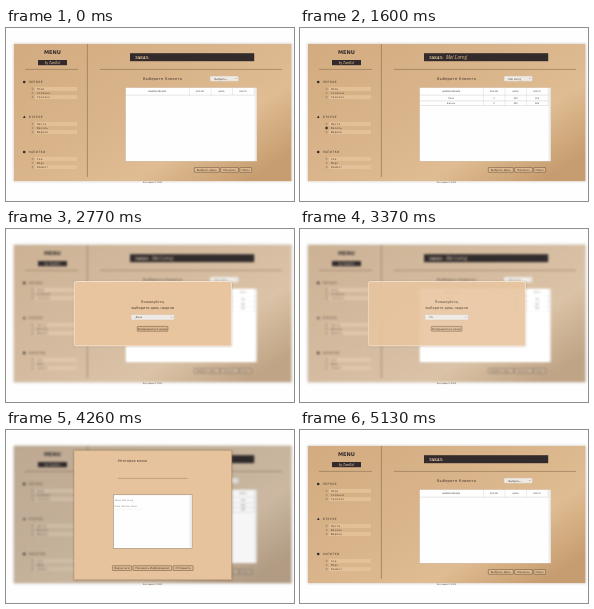
Recreate the animation shown at these times as an HTML page. Size 288 px wide and 173 px high, loop 5290 ms.

```html
<!DOCTYPE html>
<html lang="ru">
<head>
<meta charset="utf-8">
<title>Меню</title>
<style>
html, body { margin: 0; width: 100%; height: 100%; overflow: hidden; background: #fefefe; }
svg { display: block; width: 100vw; height: 100vh; }
text { font-family: "DejaVu Sans", sans-serif; fill: #4b3c31; }
.mono { font-family: "DejaVu Sans Mono", monospace; }
.serif { font-family: "Noto Serif", serif; }
.mid { text-anchor: middle; }
.b { font-weight: 700; }
.i { font-style: italic; }
</style>
</head>
<body>
<svg id="stage" viewBox="0 0 288 173" preserveAspectRatio="none">
  <defs>
    <linearGradient id="tan" x1="0" y1="0" x2="1" y2=".8">
      <stop offset="0" stop-color="#d3ab80"/>
      <stop offset=".45" stop-color="#d9b48a"/>
      <stop offset=".75" stop-color="#e0bc92"/>
      <stop offset="1" stop-color="#c69d70"/>
    </linearGradient>
    <filter id="soft" x="-10%" y="-10%" width="120%" height="120%"><feGaussianBlur stdDeviation=".8"/></filter>
  </defs>
</svg>
<script>
const NS = 'http://www.w3.org/2000/svg';
const stage = document.getElementById('stage');
const INK = '#332b2b', LINE = '#8f7152', CLIENT = 'Mei Lorng';

function add(parent, tag, attrs, content) {
  const el = document.createElementNS(NS, tag);
  for (const key in attrs) el.setAttribute(key, attrs[key]);
  if (content) el.textContent = content;
  parent.append(el);
  return el;
}
const group = parent => add(parent, 'g', {});
const rect = (p, x, y, width, height, fill, more) => add(p, 'rect', { x, y, width, height, fill, ...more });
const rule = (p, x1, y1, x2, y2, stroke = LINE, w = .6) =>
  add(p, 'line', { x1, y1, x2, y2, stroke, 'stroke-width': w });
const label = (p, x, y, size, str, cls = '', more) =>
  add(p, 'text', { x, y, 'font-size': size, class: cls, ...more }, str);

function button(p, x, y, w, str, size = 2.7) {
  const g = group(p);
  const box = rect(g, x, y, w, 4.8, '#dcb88f', { stroke: '#67503b', 'stroke-width': .5, rx: .4 });
  const txt = label(g, x + w / 2, y + 3.4, size, str, 'mid');
  return on => {
    box.setAttribute('fill', on ? INK : '#dcb88f');
    txt.style.fill = on ? '#f0d1ac' : '#4b3c31';
  };
}

function select(p, x, y, w, h, str) {
  rect(p, x, y, w, h, '#eee9e3', { stroke: '#cbbba9', 'stroke-width': .4, rx: .8 });
  add(p, 'path', { d: `M${x + w - 3.4} ${y + h / 2 - .4}l.8 .8 .8-.8`, fill: 'none', stroke: '#777', 'stroke-width': .4 });
  return label(p, x + 4.5, y + h / 2 + .9, 2.5, str);
}

// Page
const page = group(stage);
rect(page, 7.5, 15.5, 278.5, 138, '#90745a', { opacity: .35, filter: 'url(#soft)' });
rect(page, 8, 16, 277.2, 137, 'url(#tan)');
rule(page, 81.4, 16, 81.4, 149, '#9c7d5e', .8);
rule(page, 94, 41.4, 276, 41.4, '#98795a', .7);
rule(page, 19, 41.4, 72, 41.4, '#98795a', .7);
label(page, 46.5, 26.4, 5.1, 'MENU', 'mid b', { style: 'fill:#332b2b' });
rect(page, 32, 32, 29, 5.2, INK);
label(page, 46.5, 35.8, 3.1, 'by TamRol', 'mid serif i', { style: 'fill:#e9c7a0' });

const menu = [
  [54, 'ПЕРВОЕ', ['Плов', 'Солянка', 'Гаспачо']],
  [89, 'ВТОРОЕ', ['Паста', 'Фасоль', 'Жаркое']],
  [124, 'НАПИТКИ', ['Сок', 'Морс', 'Компот']]
];
const dots = [];
menu.forEach(([y, title, items], s) => {
  if (s === 1) add(page, 'path', { d: `M17 ${y + 1}l1.3-2.4 1.3 2.4z`, fill: INK });
  else add(page, 'circle', { cx: 18.2, cy: y, r: 1.3, fill: INK });
  label(page, 22.8, y + 1.2, 3, title, 'mono', { 'letter-spacing': .6 });
  items.forEach((name, i) => {
    const cy = y + 6.9 + i * 4.1;
    if (i !== 1) rect(page, 29, cy - 2, 42, 4, '#e6c29a', { opacity: .9 });
    dots.push(add(page, 'circle', { cx: 26.6, cy, r: .7, stroke: '#6d5641', 'stroke-width': .35 }));
    label(page, 31, cy + 1, 2.7, name, 'mono', { 'letter-spacing': .25 });
  });
});

rect(page, 124, 25.2, 124.2, 8, INK);
label(page, 129.2, 30.9, 3.7, 'ЗАКАЗ:', 'serif b', { style: 'fill:#f1d2ad' });
const client = label(page, 146, 31, 4.4, CLIENT, 'serif i', { style: 'fill:#e9bd8f' });
label(page, 137, 52, 3.7, 'Выберите Клиента', '', { 'letter-spacing': .15 });
const picker = select(page, 204, 48, 28.4, 5.2, '');

rect(page, 119.6, 59.6, 131.2, 73.6, '#fefefe', { stroke: '#c5ad91', 'stroke-width': .4 });
rect(page, 248.4, 60, 2, 73, '#eeeeee');
const columns = [151, 194, 215.5, 237];
const tableRow = (p, y, cells, size) => {
  cells.forEach((c, i) => label(p, columns[i], y + .8, size, c, 'mid'));
};
const grid = (p, top, bottom) => {
  [183.5, 205, 226.5, 248.2].forEach(x => rule(p, x, top, x, bottom, '#d5d1cc', .4));
  rule(p, 120, bottom, 248.2, bottom, '#c4c0bb', .4);
};
grid(page, 60, 67.2);
tableRow(page, 63.6, ['НАИМЕНОВАНИЕ', 'КОЛ-ВО', 'ЦЕНА', 'ВСЕГО'], 2.1);
const rows = [['Плов', '1', '350', '350'], ['Фасоль', '2', '300', '600'], ['Морс', '3', '100', '300']]
  .map((cells, i) => {
    const g = group(page), y = 70.6 + i * 4.6;
    tableRow(g, y - .3, cells, 2.2);
    grid(g, i ? y - 2.3 : 67.2, y + 2.3);
    return g;
  });
const dayButton = button(page, 188.3, 139.5, 25, 'Выбрать День');
const totalButton = button(page, 214.6, 139.5, 17.8, 'Показать');
button(page, 233.8, 139.5, 11.8, 'Сброс');

label(stage, 146.5, 154.7, 2, 'Все права © 2022', 'mid');

// Day dialog
const dayBox = group(stage);
rect(dayBox, 68, 52.5, 157.6, 64.8, '#8b725b', { opacity: .5, filter: 'url(#soft)' });
rect(dayBox, 68.2, 52.5, 157.2, 64.4, '#e8c59f', { stroke: '#f6e7d6', 'stroke-width': .9, rx: 1.5 });
label(dayBox, 146.8, 73.8, 3.5, 'Пожалуйста,', 'mid');
label(dayBox, 146.8, 79.5, 3.5, 'выберите день недели', 'mid');
const day = select(dayBox, 125, 85.5, 43.4, 5.5, 'День');
const backButton = button(dayBox, 131.3, 97.4, 30.6, 'Возвращаться назад', 2.65);

// Summary dialog
const sumBox = group(stage);
rect(sumBox, 67.8, 20.2, 158.4, 130.4, '#8b725b', { opacity: .65, filter: 'url(#soft)' });
rect(sumBox, 68, 20.4, 157.6, 129.4, '#e6c39d', { stroke: '#b18f6d', 'stroke-width': .4 });
label(sumBox, 112, 32, 3.6, 'Итоговое меню');
rule(sumBox, 112, 48.4, 181.5, 48.4, '#ab8965', .6);
rect(sumBox, 107.4, 64.8, 78.6, 53.6, '#fefefe', { stroke: '#8e7964', 'stroke-width': .5 });
rect(sumBox, 183.5, 65.1, 2.2, 53, '#eeeeee');
label(sumBox, 108.4, 70.7, 2.2, 'Заказ: ' + CLIENT, '', { style: 'fill:#8a7a6b' });
label(sumBox, 108.4, 76.8, 2.2, 'Плов, Фасоль, Морс', '', { style: 'fill:#8a7a6b' });
rule(sumBox, 107.8, 79.4, 137, 79.4, '#e2ddd7', .3);
button(sumBox, 106.4, 135.7, 19.2, 'Вернуться');
button(sumBox, 127, 135.7, 38.8, 'Показать Информацию', 2.75);
const sendButton = button(sumBox, 167.3, 135.7, 19.8, 'Отправить');

// Each step: [start ms, changes]
const start = { name: '', rows: 0, dot: -1, day: '', hover: '', box: '', fade: 1 };
const steps = [
  [0, {}],
  [300, { name: CLIENT }],
  [600, { dot: 0 }],
  [710, { rows: 1 }],
  [860, { dot: 1 }],
  [1010, { dot: -1 }],
  [1160, { rows: 2 }],
  [1460, { dot: 4 }],
  [1750, { rows: 3 }],
  [2040, { dot: -1 }],
  [2330, { hover: 'day' }],
  [2480, { hover: '', box: 'day' }],
  [2920, { day: 'Пн' }],
  [3220, { hover: 'back' }],
  [3370, { hover: '', fade: .9 }],
  [3520, { box: '', fade: 1 }],
  [3980, { hover: 'total' }],
  [4120, { hover: '', box: 'sum', fade: .85 }],
  [4260, { fade: 1 }],
  [5000, { hover: 'send' }],
  [5130, start]
];
const LOOP = 5290;
const show = (el, on) => { el.style.display = on ? '' : 'none'; };

function draw(t) {
  const s = { ...start };
  for (const [at, change] of steps) if (at <= t) Object.assign(s, change);
  show(client, s.name);
  picker.textContent = s.name || 'Выбрать...';
  rows.forEach((r, i) => show(r, i < s.rows));
  dots.forEach((d, i) => d.setAttribute('fill', i === s.dot ? INK : '#e3c199'));
  dots.forEach((d, i) => d.setAttribute('r', i === s.dot ? 1.2 : .7));
  dayButton(s.hover === 'day');
  totalButton(s.hover === 'total');
  backButton(s.hover === 'back');
  sendButton(s.hover === 'send');
  day.textContent = s.day || 'День';
  show(dayBox, s.box === 'day');
  show(sumBox, s.box === 'sum');
  dayBox.style.opacity = sumBox.style.opacity = s.fade;
  page.style.filter = !s.box ? 'none'
    : s.box === 'sum' ? 'blur(1.3px) saturate(.55) brightness(.97)'
    : 'blur(1.3px) saturate(.65) brightness(1.03)';
}

const origin = performance.now();
function tick() {
  draw((performance.now() - origin) % LOOP);
  requestAnimationFrame(tick);
}
tick();
</script>
</body>
</html>
```
